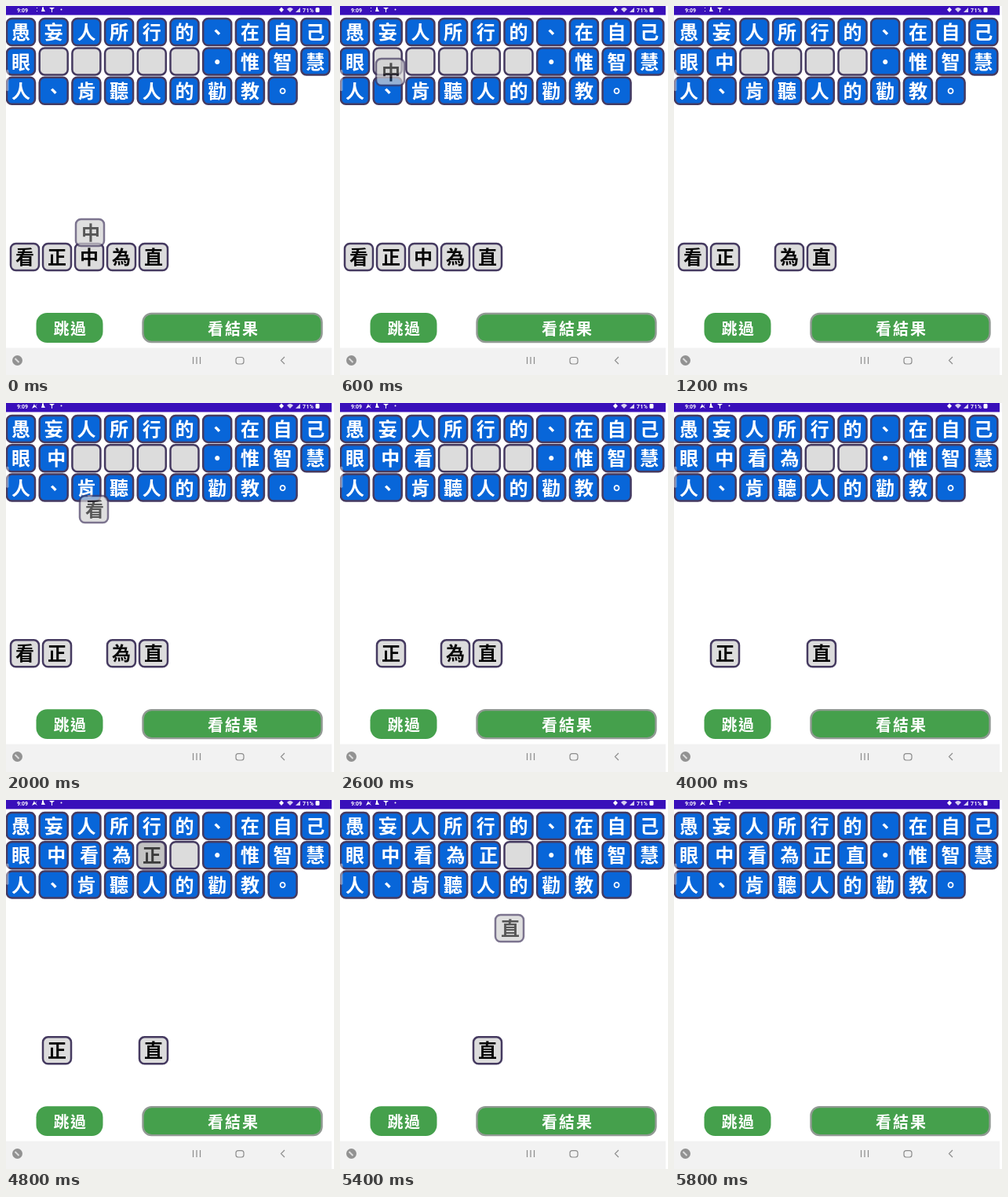
Animation of 418 by 469 pixels, one loop 6000 ms. Source, as an HTML page:

```html
<!DOCTYPE html>
<html lang="zh-Hant-TW">
<head>
<meta charset="utf-8">
<title>排字練習</title>
<style>
  html, body { margin: 0; width: 100%; height: 100%; overflow: hidden; background: #fff; }
  svg { display: block; width: 418px; height: 469px; }
  text { font-family: "Noto Sans CJK TC", "Noto Sans CJK", sans-serif; font-weight: 700; text-anchor: middle; }
  .status text { font-family: Roboto, sans-serif; font-size: 7px; text-anchor: start; fill: #fff; }
</style>
</head>
<body>
<svg id="stage" viewBox="0 0 418 469">
  <g id="screen">
    <g class="status">
      <rect width="415" height="11.5" fill="#390fba"/>
      <g id="icons">
        <text x="14" y="7.6">9:09</text>
        <g fill="#fff">
          <path id="badge"/>
          <path d="M46 1.5h2v2l2 3.5h-5l1-3.5z"/>
          <path d="M55 2h7l-3 2.5v3.5h-1V4.5z"/>
          <circle cx="70.5" cy="4.5" r="1"/>
          <path d="M351 1.5l3 3.3-3 3.2-3-3.2z"/>
          <path d="M358 4q4-4 8 0l-4 4z" opacity=".8"/>
          <path d="M369 8l6-6v6z" opacity=".8"/>
          <rect x="394.5" y="2" width="5" height="6" rx="1.5"/>
        </g>
        <text x="378" y="7.6" textLength="auto" letter-spacing=".4">71%</text>
      </g>
    </g>
    <g id="board"></g>
    <rect y="81" width="3.5" height="27" rx="1.5" fill="#fff" opacity=".4"/>
    <g id="tray"></g>
    <g fill="#45a04c">
      <rect x="38.5" y="390" width="85" height="38" rx="14"/>
      <rect x="174.5" y="391" width="228" height="36" rx="11" stroke="#929a94" stroke-width="2.4"/>
    </g>
    <g fill="#fff" font-size="20">
      <text x="82" y="417.5" letter-spacing="1.5">跳過</text>
      <text x="290" y="417.5" letter-spacing="2">看結果</text>
    </g>
    <rect y="434.5" width="415" height="36" fill="#f2f2f2"/>
    <circle cx="14.5" cy="450.5" r="6.5" fill="#929292"/>
    <path d="M11.5 448l5 5" stroke="#ddd" stroke-width="2"/>
    <g fill="none" stroke="#8c8c8c" stroke-width="1.2">
      <path d="M238.5 446v9M243 446v9M247.5 446v9M355 446l-4.5 4.5 4.5 4.5"/>
      <rect x="293" y="446.5" width="10" height="8.5" rx="3"/>
    </g>
  </g>
  <g id="ghost" opacity=".7"></g>
</svg>
<script>
const LOOP = 6000, STEP = 200;
const BLUE = '#0866d9', GREY = '#dcdcdc', HOVER = '#a0a0a0', EDGE = '#453a60';
const ROWS = ['愚妄人所行的、在自己', '眼中看為正直·惟智慧', '人、肯聽人的勸教。'];
const TRAY = '看正中為直';

// Each path is a list of [time, x, y]; the tile lands at `drop`.
const MOVES = [
  { ch: '中', drop: 1000, path: [[0, 88, 270], [200, 72, 186], [400, 53, 98], [600, 45, 66], [800, 44, 56]] },
  { ch: '看', drop: 2400, path: [[1600, 14, 276], [1800, 58, 200], [2000, 93, 117], [2200, 87, 60]] },
  { ch: '為', drop: 3800, path: [[2800, 129, 290], [3000, 130, 238], [3200, 132, 160], [3400, 129, 88], [3600, 125, 54]] },
  { ch: '正', drop: 5000, path: [[4200, 54, 272], [4400, 98, 182], [4600, 148, 92], [4800, 166, 52]] },
  { ch: '直', drop: 5800, path: [[5200, 175, 260], [5400, 197, 145], [5600, 208, 55]] }
];

const $ = id => document.getElementById(id);

function add(parent, name, attrs) {
  const el = document.createElementNS('http://www.w3.org/2000/svg', name);
  for (const key in attrs) el.setAttribute(key, attrs[key]);
  return parent.appendChild(el);
}

function makeTile(parent, x, y, ch, fill, ink, shift = 0) {
  const group = add(parent, 'g', { transform: `translate(${x} ${y})` });
  const box = add(group, 'rect', { x: 1, y: 1, width: 36, height: 34, rx: 6.5, fill, stroke: EDGE, 'stroke-width': 2.5 });
  const label = add(group, 'text', { x: 19 + shift, y: 27.2, 'font-size': 24, fill: ink });
  label.textContent = ch;
  return { group, box, label };
}

const show = (el, on) => el.setAttribute('visibility', on ? 'visible' : 'hidden');

const slots = [];
ROWS.forEach((row, r) => [...row].forEach((ch, c) => {
  const isSlot = r === 1 && c > 0 && c < 6;
  const tile = makeTile($('board'), c * 41.7, 15 + r * 37.4, ch, BLUE, '#fff', isSlot ? 3.5 : 0);
  if (isSlot) slots.push(tile);
}));

const trayTiles = {};
[...TRAY].forEach((ch, i) => {
  trayTiles[ch] = makeTile($('tray'), 5 + i * 41, 301, ch, GREY, '#080808');
});

const ghost = makeTile($('ghost'), 0, 0, '', '#d2d2d2', '#111', 1);

function pointAt(path, t) {
  const i = path.findIndex(p => p[0] > t);
  if (i < 0) return path[path.length - 1].slice(1);
  const [t0, x0, y0] = path[i - 1], [t1, x1, y1] = path[i];
  const k = (t - t0) / (t1 - t0);
  return [x0 + (x1 - x0) * k, y0 + (y1 - y0) * k];
}

function render(time) {
  const t = Math.floor(time % LOOP / STEP) * STEP;
  const late = t >= 1400;
  $('screen').setAttribute('transform', `scale(1 ${late ? 465 / 466 : 1})`);
  $('icons').setAttribute('transform', `translate(0 ${late ? -1 : 0})`);
  $('badge').setAttribute('d', late
    ? 'M33 8l3-6 1 3 3-3-2 3 2 3-3-2z'
    : 'M39 2h1v1h-1zM39 6h1v1h-1z');

  let dragging = false;
  MOVES.forEach(({ ch, drop, path }, i) => {
    const placed = t >= drop;
    const active = !placed && t >= path[0][0];
    const slot = slots[i];
    let hover = false;
    if (active) {
      const [x, y] = pointAt(path, t);
      dragging = true;
      hover = y < 62;
      ghost.group.setAttribute('transform', `translate(${x} ${y})`);
      ghost.label.textContent = ch;
    }
    slot.box.setAttribute('fill', placed ? BLUE : hover ? HOVER : GREY);
    show(slot.label, placed);
    show(trayTiles[ch].group, !placed);
  });
  show($('ghost'), dragging);
}

const start = performance.now();
function tick() {
  render(performance.now() - start);
  requestAnimationFrame(tick);
}
tick();
</script>
</body>
</html>
```
